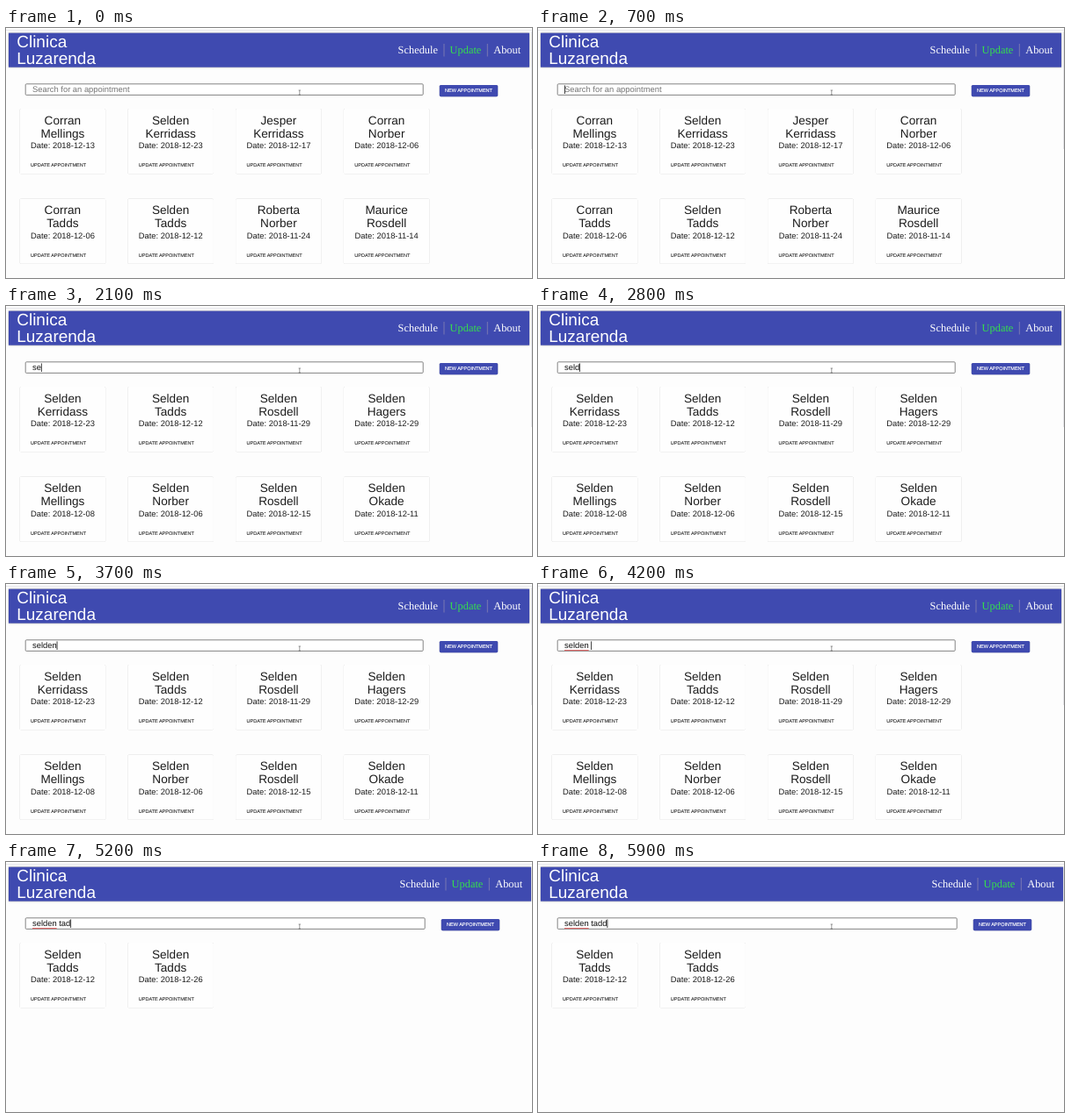
An HTML page for the animation above (6000 ms loop, 598x285 px).

```html
<!DOCTYPE html>
<html lang="en">
<head>
<meta charset="utf-8">
<title>Appointments</title>
<style>
  html, body { margin: 0; width: 100%; height: 100%; overflow: hidden; background: #fdfdfd; }
  svg { display: block; width: 598px; height: 285px; font-family: "Liberation Sans", Arial, sans-serif; }
  text { text-rendering: geometricPrecision; white-space: pre; fill: #1c1c1c; }
  .bar, .button { fill: #3f4ab0; }
  .bar { filter: drop-shadow(0 .8px 1px rgba(0, 0, 0, .35)); }
  .button { filter: drop-shadow(0 .5px .6px rgba(0, 0, 0, .3)); }
  .brand { font-size: 19px; fill: #fff; }
  .nav text { font: 12.4px "Liberation Serif", "Times New Roman", serif; fill: #fff; }
  .nav .active { fill: #35e04c; }
  .nav path { stroke: #8a86b4; stroke-width: .8; }
  .field { fill: #fff; stroke: #777; stroke-width: .9; }
  .query { font-size: 9.4px; fill: #111; }
  .hint { fill: #757575; }
  .typo { stroke: #e23b3b; stroke-width: .8; fill: none; }
  .caret { fill: #111; }
  .pointer { stroke: #555; stroke-width: .6; fill: none; }
  .card rect { fill: #fefefe; filter: drop-shadow(0 .7px .5px rgba(0, 0, 0, .24)); }
  .name, .date { text-anchor: middle; }
  .name { font-size: 13.6px; }
  .date { font-size: 9.4px; }
  .action { font-size: 5.52px; fill: #222; stroke: #222; stroke-width: .08; }
  .light { fill: #fff; stroke: #fff; stroke-width: .16; text-anchor: middle; }
</style>
</head>
<body>
<svg viewBox="0 0 598 285">
  <rect y="2" width="598" height=".7" fill="#dedee2"/>
  <rect class="bar" id="bar" x="3" y="5.7" width="592" height="39"/>
  <text class="brand" x="12.2" y="21.8">Clinica</text>
  <text class="brand" x="12.2" y="41">Luzarenda</text>
  <g class="nav slide">
    <text x="445.6" y="29.2">Schedule</text>
    <path d="M498 18v14.5M547.3 18v14.5"/>
    <text class="active" x="504.6" y="29.2">Update</text>
    <text x="554.2" y="29.2">About</text>
  </g>
  <rect id="scroll" x="597" y="4" width="1" height="134" fill="#e4e4e8"/>

  <rect class="field" id="field" x="22.2" y="63.8" width="452" height="12.6" rx="1"/>
  <text class="query hint" id="hint" x="30" y="73.1">Search for an appointment</text>
  <text class="query" id="query" x="30" y="73.1"></text>
  <path class="typo" id="typo" d="M30 75.6h27.7"/>
  <rect class="caret" id="caret" y="65.4" width=".8" height="9.6"/>
  <path class="pointer" d="M332.6 71h2.4M333.8 71v5.2M332.6 76.2h2.4"/>
  <g class="slide">
    <rect class="button" x="492.8" y="65" width="66.4" height="13.2" rx="1.6"/>
    <text class="action light" x="526" y="73.4">NEW APPOINTMENT</text>
  </g>
  <g id="cards"></g>
</svg>
<script>
const LOOP = 6000;
const PER_ROW = 4, VISIBLE = 8;
const PHRASE = "selden tadd";
const KEY_TIMES = [1500, 1900, 2200, 2600, 3000, 3300, 4000, 4400, 4800, 5200, 5600];
const FOCUS = 500, BLINK = 500;

const appointments = `Corran Mellings 12-13
Selden Kerridass 12-23
Jesper Kerridass 12-17
Corran Norber 12-06
Corran Tadds 12-06
Selden Tadds 12-12
Roberta Norber 11-24
Maurice Rosdell 11-14
Lukas Rosdell 11-23
Selden Rosdell 11-29
Selden Hagers 12-29
Selden Mellings 12-08
Selden Norber 12-06
Selden Rosdell 12-15
Selden Okade 12-11
Selden Tengmead 12-31
Selden Tengmead 12-01
Selden Tadds 12-26`.split("\n").map(line => line.split(" "));

const $ = id => document.getElementById(id);
const show = (el, on) => el.setAttribute("visibility", on ? "visible" : "hidden");

function cardMarkup([first, last, day], i) {
  const x = 15.6 + (i % PER_ROW) * 122.75;
  const y = 92 + Math.floor(i / PER_ROW) * 102.5;
  return `<g class="card" transform="translate(${x} ${y})">
    <rect width="97.6" height="74.3" rx="1.6"/>
    <text class="name" x="48.8" y="17.5">${first}</text>
    <text class="name" x="48.8" y="32.9">${last}</text>
    <text class="date" x="48.8" y="45.4">Date: 2018-${day}</text>
    <text class="action" x="12.4" y="66.4">UPDATE APPOINTMENT</text>
  </g>`;
}

let typed = -1;

function update(count) {
  typed = count;
  const text = PHRASE.slice(0, count);
  const found = appointments.filter(([a, b]) => `${a} ${b}`.toLowerCase().includes(text));
  $("cards").innerHTML = found.slice(0, VISIBLE).map(cardMarkup).join("");

  $("query").textContent = text;
  show($("hint"), !count);
  show($("typo"), count > PHRASE.indexOf(" "));
  $("caret").setAttribute("x", 30 + (count ? $("query").getComputedTextLength() : 0));

  // The page widens once the results no longer need a scrollbar.
  const scrolls = found.length > PER_ROW;
  const extra = scrolls ? 0 : 2;
  show($("scroll"), scrolls);
  $("bar").setAttribute("width", 592 + extra);
  $("field").setAttribute("width", 452 + extra);
  document.querySelectorAll(".slide").forEach(el =>
    el.setAttribute("transform", `translate(${extra} 0)`));
}

function frame() {
  const t = performance.now() % LOOP;
  const count = KEY_TIMES.filter(k => k <= t).length;
  if (count !== typed) update(count);
  const since = t - (count ? KEY_TIMES[count - 1] : FOCUS);
  show($("caret"), since >= 0 && Math.floor(since / BLINK) % 2 === 0);
  requestAnimationFrame(frame);
}
frame();
</script>
</body>
</html>
```
